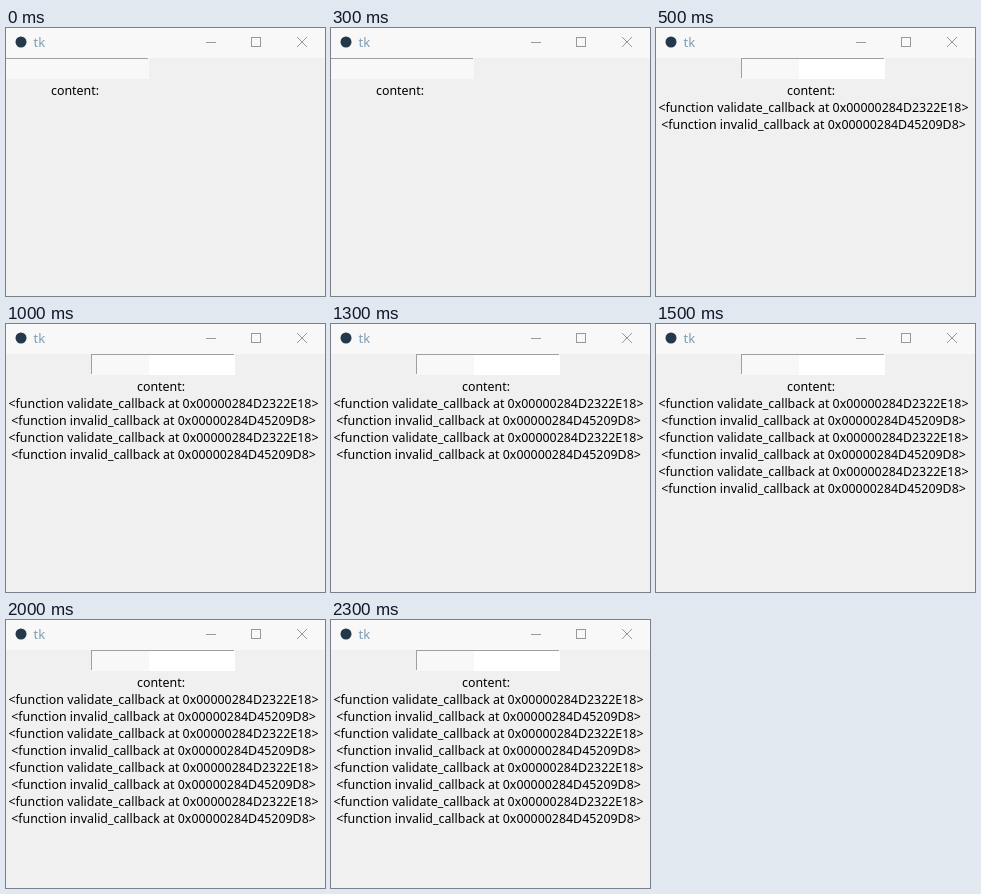
Animation of 319x268 px, one loop 2.5 s. Source, as an HTML page with a canvas:

```html
<!DOCTYPE html>
<html lang="en">
<head>
<meta charset="utf-8">
<title>tk</title>
<style>
  html, body { margin: 0; width: 100%; height: 100%; overflow: hidden; background: #f0f0f0; }
  canvas { display: block; }
</style>
</head>
<body>
<canvas id="stage" width="319" height="268"></canvas>
<script>
const ctx = document.getElementById("stage").getContext("2d");
const STEP = 500;
const STEPS = 5;
const LINE_HEIGHT = 17;
const FONT = '"Noto Sans", "Open Sans", sans-serif';
const MESSAGES = [
  "<function validate_callback at 0x00000284D2322E18>",
  "<function invalid_callback at 0x00000284D45209D8>"
];

function rect(color, x, y, w, h) {
  ctx.fillStyle = color;
  ctx.fillRect(x, y, w, h);
}

function text(value, x, y, { size = 12.4, color = "#000", align = "center" } = {}) {
  ctx.font = `${size}px ${FONT}`;
  ctx.textAlign = align;
  ctx.fillStyle = color;
  ctx.fillText(value, x, y);
}

function drawTitleBar() {
  rect("#f8f8f8", 0, 0, 319, 30);
  ctx.fillStyle = "#24384c";
  ctx.beginPath();
  ctx.arc(15, 14, 5.5, 0, Math.PI * 2);
  ctx.fill();
  text("tk", 27.5, 19, { size: 13, color: "#7c9db5", align: "left" });

  rect("#999", 200, 14, 10, 1);
  ctx.strokeStyle = "#999";
  ctx.lineWidth = 1;
  ctx.strokeRect(245.5, 9.5, 9, 9);
  ctx.beginPath();
  ctx.moveTo(291, 9);
  ctx.lineTo(301, 19);
  ctx.moveTo(301, 9);
  ctx.lineTo(291, 19);
  ctx.stroke();
}

function drawEntry(x, width) {
  rect("#fff", x, 30, width, 21);
  rect("#f8f8f8", x, 30, 143 - x, 21);
  rect("#a0a0a0", x, 30, width - 1, 1);
  if (x > 0) rect("#a0a0a0", x, 30, 1, 20);
}

function draw(step) {
  rect("#f0f0f0", 0, 0, 319, 268);
  drawTitleBar();
  drawEntry(step ? 85 : 0, step ? 144 : 143);
  text("content:", step ? 155 : 69, 67);
  for (let i = 0; i < step * 2; i++) {
    text(MESSAGES[i % 2], 157.5, 84 + i * LINE_HEIGHT);
  }
}

let shown = -1;
function tick() {
  const step = Math.floor(performance.now() / STEP) % STEPS;
  if (step !== shown) draw(shown = step);
  requestAnimationFrame(tick);
}
tick();
</script>
</body>
</html>
```
